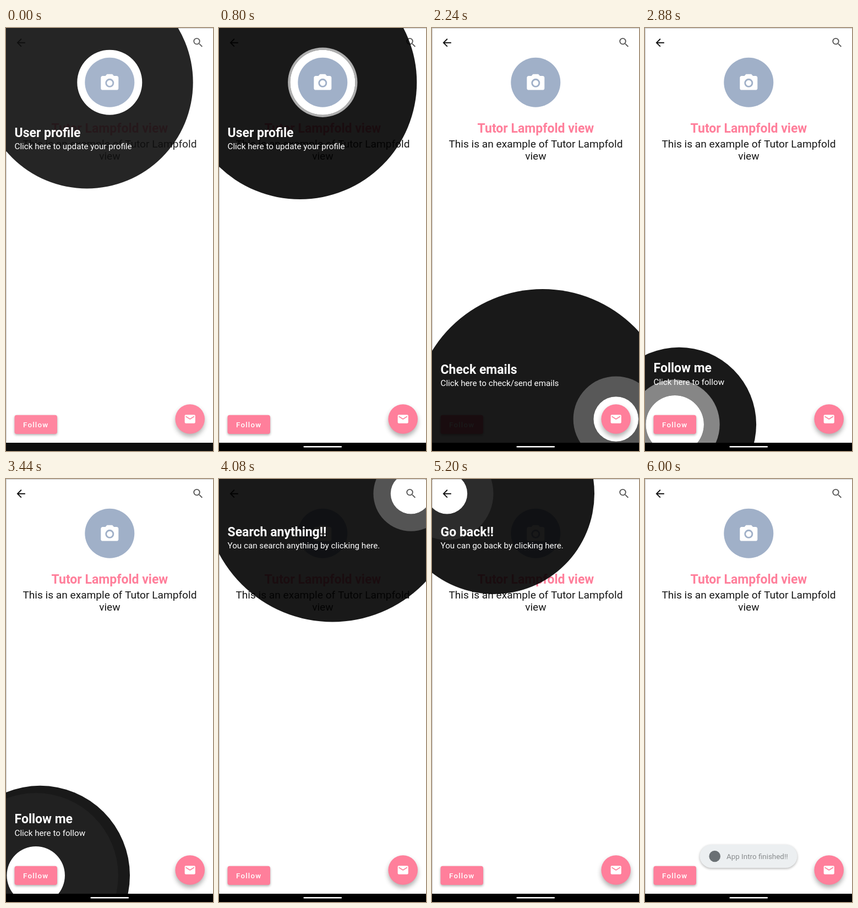
Recreate the animation shown at these times as an HTML page with a canvas. Size 376 by 768 pixels, loop 6080 ms.

```html
<!DOCTYPE html>
<html lang="en">
<head>
<meta charset="utf-8">
<title>Guided tour</title>
<style>
  html, body { margin: 0; width: 100%; height: 100%; overflow: hidden; background: #fff; }
  canvas { display: block; width: 376px; height: 768px; }
</style>
</head>
<body>
<canvas id="stage"></canvas>
<script>
const W = 376, H = 768, LOOP = 6080, STEP = 80, BAR = 753;
const DP = 0.957;          // stage pixels per layout unit
const SPEED = 1.1;         // animation clock against loop clock
const PINK = '#ff7f9b';
const TOUR_END = 5760;

const canvas = document.getElementById('stage');
const ratio = window.devicePixelRatio || 1;
canvas.width = W * ratio;
canvas.height = H * ratio;
const g = canvas.getContext('2d');
g.scale(ratio, ratio);

const icons = {
  back: 'M20 11H7.83l5.59-5.59L12 4l-8 8 8 8 1.41-1.41L7.83 13H20z',
  search: 'M15.5 14h-.79l-.28-.27A6.47 6.47 0 0 0 16 9.5 6.5 6.5 0 1 0 9.5 16c1.61 0 3.09-.59 4.23-1.57l.27.28v.79l5 4.99L20.49 19zM9.5 14a4.5 4.5 0 1 1 0-9 4.5 4.5 0 0 1 0 9z',
  camera: 'M8.8 12a3.2 3.2 0 1 0 6.4 0 3.2 3.2 0 1 0-6.4 0M9 2 7.17 4H4c-1.1 0-2 .9-2 2v12c0 1.1.9 2 2 2h16c1.1 0 2-.9 2-2V6c0-1.1-.9-2-2-2h-3.17L15 2zm3 15a5 5 0 1 1 0-10 5 5 0 0 1 0 10z',
  mail: 'M20 4H4c-1.1 0-2 .9-2 2v12c0 1.1.9 2 2 2h16c1.1 0 2-.9 2-2V6c0-1.1-.9-2-2-2zm0 4-8 5-8-5V6l8 5 8-5z'
};

// x, y, size: highlighted control; cx, r: large disc; base: title baseline
const tour = [
  { start: -225, x: 188.3, y: 98.7, size: 90, cx: 147, r: 212.3, base: 197.5,
    title: 'User profile', note: 'Click here to update your profile' },
  { start: 1410, x: 334.2, y: 710, size: 53.6, cx: 201, r: 236, base: 627.5,
    title: 'Check emails', note: 'Click here to check/send emails' },
  { start: 2690, x: 54.2, y: 719.8, size: 77.5, cx: 62, r: 163, base: 625,
    title: 'Follow me', note: 'Click here to follow' },
  { start: 3500, x: 348.7, y: 26.5, size: 45.9, cx: 206, r: 233, base: 103.5,
    title: 'Search anything!!', note: 'You can search anything by clicking here.' },
  { start: 4620, x: 27.2, y: 26.5, size: 45.9, cx: 112.5, r: 182.5, base: 103.5,
    title: 'Go back!!', note: 'You can go back by clicking here.' }
];

const clamp = v => Math.max(0, Math.min(1, v));

// Cubic bezier easing, solved by bisection
function bezier(x1, y1, x2, y2) {
  const curve = (a, b, u) => 3 * a * u * (1 - u) ** 2 + 3 * b * u * u * (1 - u) + u ** 3;
  return x => {
    let lo = 0, hi = 1;
    for (let i = 0; i < 24; i++) {
      const mid = (lo + hi) / 2;
      if (curve(x1, x2, mid) < x) lo = mid; else hi = mid;
    }
    return curve(y1, y2, lo);
  };
}
const grow = bezier(0.4, 0, 0.2, 1);
const spread = bezier(0.4, 0, 1, 1);

function disc(x, y, r, color) {
  g.fillStyle = color;
  g.beginPath();
  g.arc(x, y, r, 0, 7);
  g.fill();
}

function pill(x, y, w, h, r, color) {
  g.fillStyle = color;
  g.beginPath();
  g.roundRect(x, y, w, h, r);
  g.fill();
}

function shadowed(blur, drop, alpha, draw) {
  g.save();
  g.shadowColor = `rgba(0,0,0,${alpha})`;
  g.shadowBlur = blur * ratio;
  g.shadowOffsetY = drop * ratio;
  draw();
  g.restore();
}

function icon(name, x, y, scale, color) {
  g.save();
  g.translate(x, y);
  g.scale(scale, scale);
  g.translate(-12, -12);
  g.fillStyle = color;
  g.fill(new Path2D(icons[name]), 'evenodd');
  g.restore();
}

function text(str, x, y, size, weight, color, align = 'left', spacing = 0) {
  g.font = `${weight} ${size}px Roboto, sans-serif`;
  g.letterSpacing = spacing + 'px';
  g.textAlign = align;
  g.fillStyle = color;
  g.fillText(str, x, y);
}

function drawPage() {
  g.fillStyle = '#fff';
  g.fillRect(0, 0, W, H);
  g.fillStyle = '#c8c8c8';
  g.fillRect(0, 0, W, 1);
  g.fillRect(0, 0, 1, BAR);

  icon('back', 27.2, 26.7, DP, '#111');
  icon('search', 348.9, 26.5, DP, '#555');
  disc(188.3, 98.7, 45, '#a0b0c8');
  icon('camera', 188.3, 99.8, 1.6, '#fff');

  text('Tutor Lampfold view', 188.4, 190, 23, 700, PINK, 'center');
  text('This is an example of Tutor Lampfold', 188.4, 216.5, 19.14, 400, '#161616', 'center');
  text('view', 188.4, 238.5, 19.14, 400, '#161616', 'center');

  shadowed(4, 2, 0.32, () => pill(15.5, 702.7, 77.5, 34.4, 4, PINK));
  text('Follow', 31, 725, 13.4, 500, '#fff', 'left', 1.2);
  shadowed(9, 5, 0.32, () => disc(334.2, 710, 26.8, PINK));
  icon('mail', 334.2, 710, DP, '#fff');
}

function drawTour(t) {
  if (t >= TOUR_END) return;
  const stop = tour.findLast(s => s.start <= t);
  const scale = 0.6 + 0.4 * grow(clamp((t - stop.start) * SPEED / 500));

  // Everything but the round window
  g.save();
  g.beginPath();
  g.rect(0, 0, W, BAR);
  g.moveTo(stop.x + stop.size / 2 + 14, stop.y);
  g.arc(stop.x, stop.y, stop.size / 2 + 14, 0, 2 * Math.PI);
  g.clip('evenodd');
  disc(stop.cx, stop.y, stop.r * scale, 'rgba(0,0,0,.9)');

  const clock = 166 + 1.1023 * t;
  for (const delay of [0, 1000]) {
    if (clock < delay) continue;
    const p = spread((clock - delay) % 2000 / 2000);
    disc(stop.x, stop.y, stop.size * 2 * p, `rgba(255,255,255,${1 - p})`);
  }
  g.restore();

  text(stop.title, 15.5, stop.base, 23, 700, '#fff');
  text(stop.note, 15.5, stop.base + 22.5, 15.2, 400, '#fff');

  // Finger on the avatar
  if (t >= 1320 && t < tour[1].start) {
    disc(198, 100, 12, 'rgba(255,255,255,.3)');
    disc(198, 100, 9.5, 'rgba(255,255,255,.45)');
  }
}

function drawToast(t) {
  g.save();
  g.globalAlpha = clamp((t - 5840) / 160);
  shadowed(4, 1.5, 0.3, () => pill(99.5, 664, 177, 42, 21, '#eceff1'));
  disc(126.7, 685, 10.3, '#6a7074');
  text('App Intro finished!!', 148, 690, 13.4, 400, '#898c8e');
  g.restore();
}

function drawBar(t) {
  g.fillStyle = '#000';
  g.fillRect(0, BAR, W, H - BAR);
  g.globalAlpha = clamp(t / 320);
  pill(153.5, 759, 69.5, 2.6, 1.3, '#fff');
  g.globalAlpha = 0.05 * clamp(1 - t / 240);
  g.fillStyle = '#fff';
  g.fillRect(0, 0, W, H);
  g.globalAlpha = 1;
}

const begin = performance.now();
function frame() {
  const t = Math.floor(Math.max(0, performance.now() - begin) % LOOP / STEP) * STEP;
  drawPage();
  drawTour(t);
  if (t > 5840) drawToast(t);
  drawBar(t);
  requestAnimationFrame(frame);
}
frame();
</script>
</body>
</html>
```
